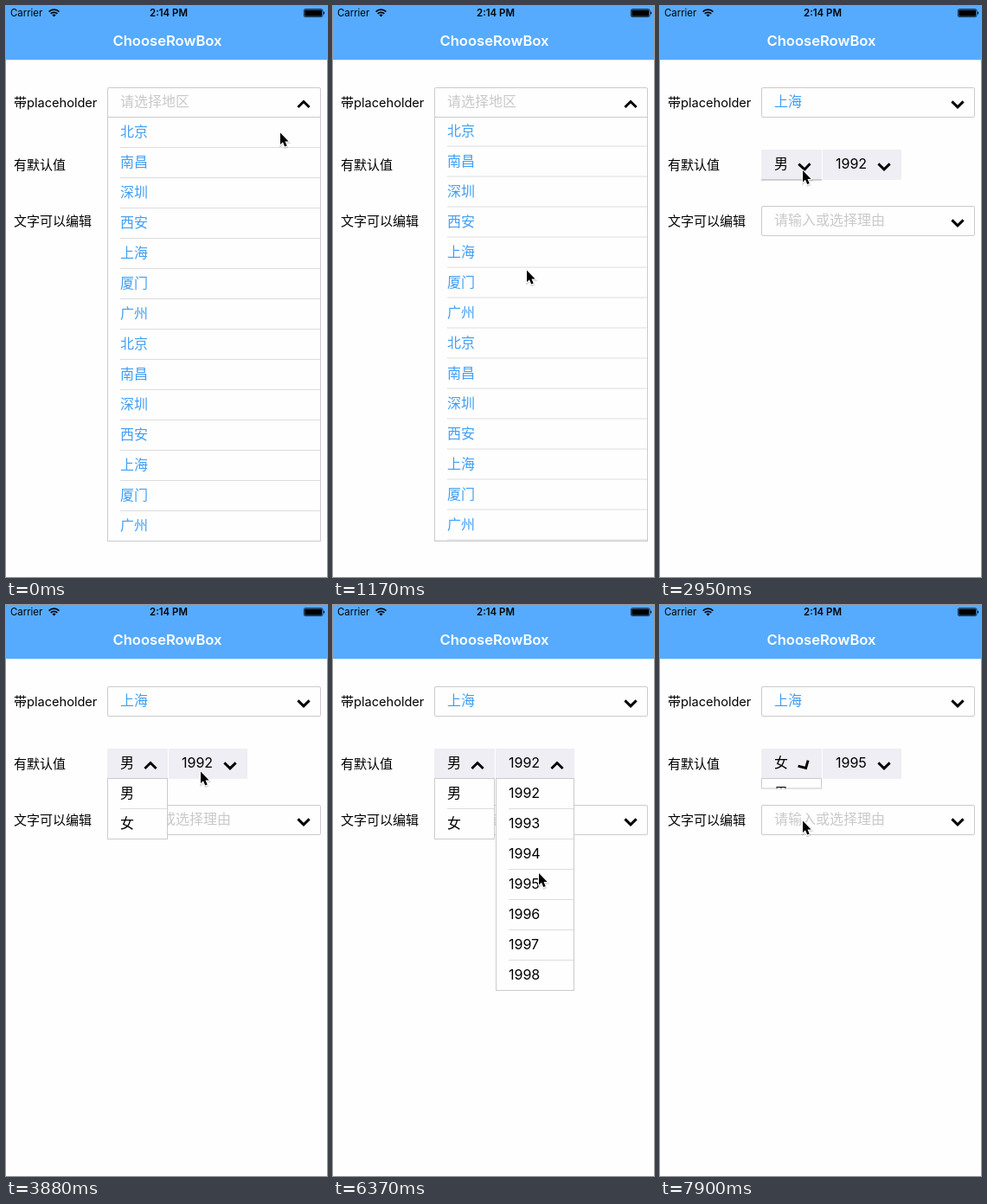
Animation, 371 px wide and 660 px high, one loop 8000 ms. Source, as an HTML page:

```html
<!DOCTYPE html>
<html lang="zh-CN">
<head>
<meta charset="utf-8">
<title>Drop-down demo</title>
<style>
html, body { margin: 0; width: 100%; height: 100%; overflow: hidden; background: #fefefe; }
svg { display: block; }
text { font-family: Inter, "Noto Sans CJK SC", "Noto Sans CJK", sans-serif; white-space: pre; }
</style>
</head>
<body>
<script>
const LOOP = 8000, STEP = 117.9, OPEN = 300 / STEP;
const BLUE = '#409ff5', INK = '#000', HINT = '#c9c9cc', LINE = '#cbcbcd', PAPER = '#fefefe';
const CARET = 'M-6.6 -3.3L0 3.2L6.6 -3.3';

function add(parent, tag, attrs, text) {
  const el = document.createElementNS('http://www.w3.org/2000/svg', tag);
  set(el, attrs);
  if (text) el.textContent = text;
  parent.appendChild(el);
  return el;
}
function set(el, attrs) {
  for (const name in attrs) el.setAttribute(name, attrs[name]);
}
function label(parent, x, y, size, text, fill = INK, extra = {}) {
  return add(parent, 'text', { x, y, 'font-size': size, fill, ...extra }, text);
}

const stage = add(document.body, 'svg', { width: 371, height: 660, viewBox: '0 0 371 660' });
add(stage, 'rect', { width: 371, height: 660, fill: PAPER });

// Status and title bar
add(stage, 'rect', { width: 371, height: 62, fill: '#56abff' });
add(stage, 'rect', { y: 62, width: 371, height: .5, fill: '#b4cfe8' });
label(stage, 5, 12.4, 11.4, 'Carrier');
label(stage, 188, 12.4, 11.4, '2:14 PM', INK, { 'text-anchor': 'middle', 'font-weight': 600 });
const wifi = add(stage, 'g', { fill: 'none', stroke: INK, 'stroke-width': 1.7 });
add(wifi, 'path', { d: 'M49.6 6.6A8.2 8.2 0 0 1 61.4 6.6M51.7 8.9A5.3 5.3 0 0 1 59.3 8.9' });
add(wifi, 'path', { d: 'M55.5 12.6L53.4 10.5A3 3 0 0 1 57.6 10.5Z', fill: INK, stroke: 'none' });
add(stage, 'rect', { x: 344.4, y: 3.6, width: 21.6, height: 9, rx: 1.6, fill: 'none', stroke: INK, 'stroke-width': .7 });
add(stage, 'rect', { x: 345.3, y: 4.5, width: 19.8, height: 7.2, rx: .8 });
add(stage, 'path', { d: 'M367 6.3A2 2 0 0 1 367 9.9Z' });
label(stage, 186.5, 46, 16.6, 'ChooseRowBox', '#fff', { 'text-anchor': 'middle', 'font-weight': 600 });

label(stage, 9, 117.2, 15, '带');
label(stage, 24, 117.2, 14.6, 'placeholder');
label(stage, 9, 189.2, 15, '有默认值');
label(stage, 9, 254.2, 15, '文字可以编辑');

function field(x, y, w, text, color, filled) {
  const box = filled
    ? { x, y, width: w, height: 35, fill: '#efeef4' }
    : { x: x + .5, y: y + .5, width: w - 1, height: 34, rx: 1.5, fill: PAPER, stroke: LINE };
  add(stage, 'rect', box);
  const value = label(stage, x + 15, y + 22.4, 16, text, color);
  const caret = add(stage, 'path', { d: CARET, fill: 'none', stroke: INK, 'stroke-width': 2.9 });
  const cx = x + w - 20, cy = y + 19.7;
  const turn = open => set(caret, { transform: `translate(${cx} ${cy}) rotate(${-180 * open})` });
  turn(0);
  return { value, turn };
}

function menu(x, y, w, rows, color, head) {
  const full = rows.length * 35, top = y + 34;
  const group = add(stage, 'g', {});
  const view = add(group, 'svg', { x, y: top, width: w, height: full });
  add(view, 'rect', { width: w, height: full, fill: '#e4e4e4' });
  const body = add(view, 'g', {});
  add(body, 'rect', { width: w, height: full + 1, fill: PAPER });
  rows.forEach((row, i) => {
    label(body, 15, i * 35 + 23.4, 16, row, color);
    add(body, 'rect', { x: 15, y: i * 35 + 35, width: w - 15, height: 1, fill: '#dddde0' });
  });
  const frame = add(group, 'rect', { x: x + .5, y: top + .5, width: w - 1, fill: 'none', stroke: LINE });
  return (open, scroll = 0) => {
    const h = full * open;
    set(group, { display: open > 0.002 ? 'inline' : 'none' });
    set(view, { height: h + 1 });
    set(frame, { height: h });
    set(body, { transform: `translate(0 ${-scroll})` });
    head.turn(open);
  };
}

const cities = ['北京', '南昌', '深圳', '西安', '上海', '厦门', '广州'];
const years = Array.from({ length: 7 }, (_, i) => String(1992 + i));

const city = field(117, 94, 247, '请选择地区', HINT);
const sex = field(117, 166, 70, '男', INK, true);
const year = field(188, 166, 91, '1992', INK, true);
field(117, 231, 247, '请输入或选择理由', HINT);

const cityMenu = menu(117, 94, 247, [...cities, ...cities], BLUE, city);
const sexMenu = menu(117, 166, 70, ['男', '女'], INK, sex);
const yearMenu = menu(188, 166, 91, years, INK, year);

const pointer = add(stage, 'g', {});
const ARROW = 'M0 0V13.6L3 10.8L5.2 16L7.7 15L5.5 9.9H9.6Z';
add(pointer, 'path', { d: ARROW, transform: 'translate(.3 1.6)', fill: INK, stroke: INK, 'stroke-width': 2.2, opacity: .14 });
add(pointer, 'path', { d: ARROW, fill: INK, stroke: '#fff', 'stroke-width': 2, 'stroke-linejoin': 'round', 'paint-order': 'stroke' });

// Pointer path: step, x, y
const path = [
  [0, 317, 146.5], [5, 274, 163.5], [10, 224, 305.5], [14, 210, 284], [17, 209, 281],
  [21, 179, 206], [23, 165, 190], [26, 165, 190], [31, 217, 194], [33, 225, 192.5],
  [38, 225, 192.5], [42, 252, 186], [45, 252, 186], [50, 243, 278], [54, 238, 310],
  [56, 238, 310], [62, 163, 250], [63, 159, 249.5], [65, 159, 249.5], [67, 165, 249.5], [68, 165, 249.5]
];

function pointAt(k) {
  const i = Math.max(1, path.findIndex(p => p[0] >= k));
  const [a, ax, ay] = path[i - 1], [b, bx, by] = path[i];
  const f = (k - a) / (b - a);
  return [ax + (bx - ax) * f, ay + (by - ay) * f];
}

// Ease-in-out, cubic-bezier(.42, 0, .58, 1)
function ease(x) {
  if (x <= 0) return 0;
  if (x >= 1) return 1;
  let lo = 0, hi = 1, u;
  for (let i = 0; i < 24; i++) {
    u = (lo + hi) / 2;
    const bx = 1.26 * (1 - u) ** 2 * u + 1.74 * (1 - u) * u * u + u ** 3;
    if (bx < x) lo = u; else hi = u;
  }
  return u * u * (3 - 2 * u);
}
const ramp = (k, start) => ease((k - start) / OPEN);

// Overscroll: quick pull, hold, then spring back
function scrollAt(k) {
  if (k < 4) return 0;
  if (k <= 7) return 30;
  return k < 12 ? 30 * Math.exp(-(k - 7)) : 0;
}

function show(value, text, fill) {
  if (value.textContent !== text) value.textContent = text;
  set(value, { fill });
}

function draw(ms) {
  const k = Math.floor((ms % LOOP + 12) / STEP);
  const picked = k >= 15;
  show(city.value, picked ? '上海' : '请选择地区', picked ? BLUE : HINT);
  show(sex.value, k >= 65 ? '女' : '男', INK);
  show(year.value, k >= 56 ? '1995' : '1992', INK);
  cityMenu(1 - ramp(k, 14.89), scrollAt(k));
  sexMenu(ramp(k, 24.8) - ramp(k, 65.17));
  yearMenu(ramp(k, 43.8) - ramp(k, 55.8));
  set(pointer, { transform: `translate(${pointAt(k)})` });
}

let begin;
function tick(now) {
  begin ??= now;
  draw(now - begin);
  requestAnimationFrame(tick);
}
draw(0);
requestAnimationFrame(tick);
</script>
</body>
</html>
```
